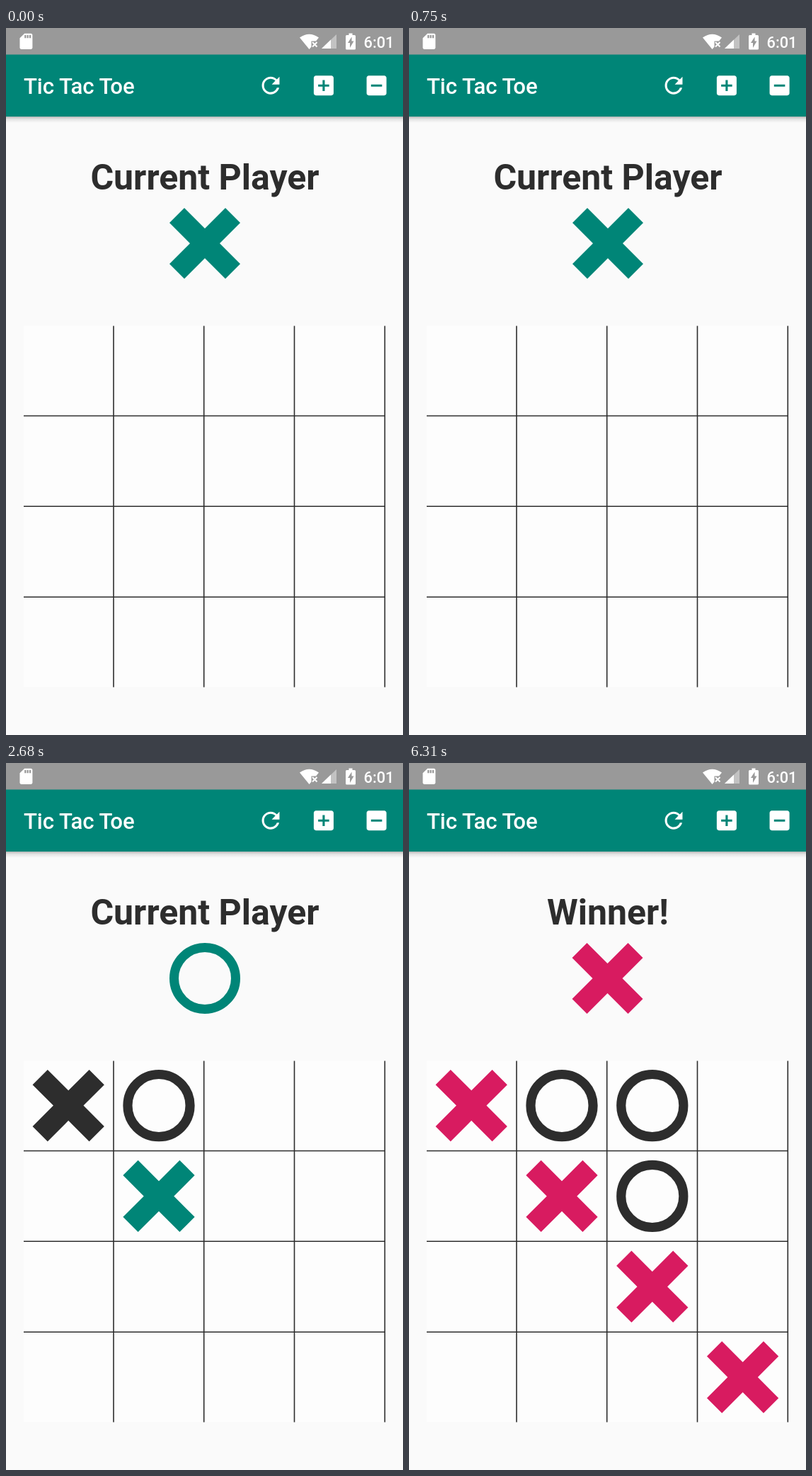
These frames come from a looping animation (561 px wide and 998 px high, 8 s). An HTML page:

```html
<!DOCTYPE html>
<html lang="en">
<head>
<meta charset="utf-8">
<title>Tic Tac Toe</title>
<style>
  html, body { margin: 0; width: 100%; height: 100%; overflow: hidden; background: #fafafa; }
  svg { display: block; width: 561px; height: 998px; }
  text { font-family: Roboto, sans-serif; font-weight: 500; fill: #fff; }
  #title { font-size: 50px; font-weight: 700; fill: #2d2d2d; text-anchor: middle; }
</style>
</head>
<body>
<svg viewBox="0 0 561 998">
  <defs>
    <linearGradient id="shade" x2="0" y2="1">
      <stop stop-color="#000" stop-opacity=".27"/>
      <stop offset=".4" stop-color="#000" stop-opacity=".09"/>
      <stop offset="1" stop-color="#000" stop-opacity="0"/>
    </linearGradient>
    <path id="X" d="M-29-50 0-21 29-50 50-29 21 0 50 29 29 50 0 21-29 50-50 29-21 0-50-29z" fill="currentColor"/>
    <circle id="O" r="43.5" fill="none" stroke="currentColor" stroke-width="13"/>
  </defs>

  <rect width="561" height="998" fill="#fafafa"/>
  <rect y="125" width="561" height="9" fill="url(#shade)"/>
  <rect y="37" width="561" height="88" fill="#008577"/>
  <rect width="561" height="37.5" fill="#999"/>

  <!-- status bar -->
  <g fill="#fff">
    <path transform="translate(15 5.4) scale(1.12)" d="M18 2h-8L4 8v12c0 1.1.9 2 2 2h12c1.1 0 2-.9 2-2V4c0-1.1-.9-2-2-2zm-6 6h-2V4h2zm3 0h-2V4h2zm3 0h-2V4h2z"/>
    <path d="M415 13.5Q428.500 4 442 13.500L438 18.500H431.500V26.500L428.500 30z"/>
    <path d="M433 20l6.500 6.500m0-6.500l-6.500 6.500" stroke="#fff" stroke-width="2"/>
    <path d="M467 9V29H446z" opacity=".4"/>
    <path d="M459 16.600V29H446z"/>
    <path d="M484.500 7.500h5v2.500h3q1.500 0 1.500 1.500v17.500q0 1.500-1.500 1.500h-11q-1.500 0-1.500-1.500v-17.500q0-1.500 1.500-1.500h3z"/>
    <path d="M488.500 12.500v6h3l-5.500 9.500v-7h-3z" fill="#999"/>
  </g>
  <text x="505.500" y="27.500" font-size="21.800">6:01</text>

  <!-- app bar -->
  <text x="24.900" y="93" font-size="31.200">Tic Tac Toe</text>
  <g fill="#fff">
    <path transform="translate(355.300 62.500) scale(1.558)" d="M17.650 6.350C16.200 4.900 14.210 4 12 4c-4.420 0-7.990 3.580-7.990 8s3.570 8 7.990 8c3.730 0 6.840-2.550 7.730-6h-2.080c-.82 2.330-3.040 4-5.650 4-3.310 0-6-2.690-6-6s2.690-6 6-6c1.660 0 3.140.69 4.220 1.780L13 11h7V4z"/>
    <path transform="translate(430.200 62.500) scale(1.558)" d="M19 3H5c-1.100 0-2 .9-2 2v14c0 1.100.9 2 2 2h14c1.100 0 2-.9 2-2V5c0-1.100-.9-2-2-2zm-2 10h-4v4h-2v-4H7v-2h4V7h2v4h4z"/>
    <path transform="translate(504.900 62.500) scale(1.558)" d="M19 3H5c-1.100 0-2 .9-2 2v14c0 1.100.9 2 2 2h14c1.100 0 2-.9 2-2V5c0-1.100-.9-2-2-2zm-2 10H7v-2h10z"/>
  </g>

  <text id="title" x="281" y="228"></text>
  <rect x="25" y="420" width="511" height="510.500" fill="#fdfdfd"/>
  <path d="M152 420.500v510M279.700 420.500v510M407.500 420.500v510M535.300 420.500v510M25 547.500h511M25 675.300h511M25 803.200h511" stroke="#2d2d2d" stroke-width="1.600"/>
  <g id="marks"></g>
</svg>
<script>
const LOOP = 8000, WIN = 6310;
const TEAL = '#008577', DARK = '#2d2d2d', PINK = '#d81b60';
// time, mark, column, row
const moves = [
  [880, 'X', 0, 0], [1590, 'O', 1, 0], [2680, 'X', 1, 1], [3150, 'O', 2, 1],
  [5550, 'X', 2, 2], [5550, 'O', 2, 0], [WIN, 'X', 3, 3]
];
const title = document.getElementById('title');
const marks = document.getElementById('marks');
let shown = '';

const mark = (kind, x, y, color, scale = 1) =>
  `<use href="#${kind}" transform="translate(${x} ${y}) scale(${scale})" color="${color}"/>`;

function draw(t) {
  const won = t >= WIN;
  const played = moves.filter(m => m[0] <= t);
  const player = won || played.length % 2 === 0 ? 'X' : 'O';
  const board = played.map(([, kind, col, row], i) => {
    const color = won ? (kind === 'X' ? PINK : DARK) : i === played.length - 1 ? TEAL : DARK;
    return mark(kind, 88.2 + 127.8 * col, 483.6 + 127.8 * row, color, 1.013);
  });
  const html = mark(player, won ? 280.5 : 281, 304, won ? PINK : TEAL) + board.join('');
  if (html === shown) return;
  shown = html;
  marks.innerHTML = html;
  title.textContent = won ? 'Winner!' : 'Current Player';
}

function tick() {
  draw(performance.now() % LOOP);
  requestAnimationFrame(tick);
}
tick();
</script>
</body>
</html>
```
